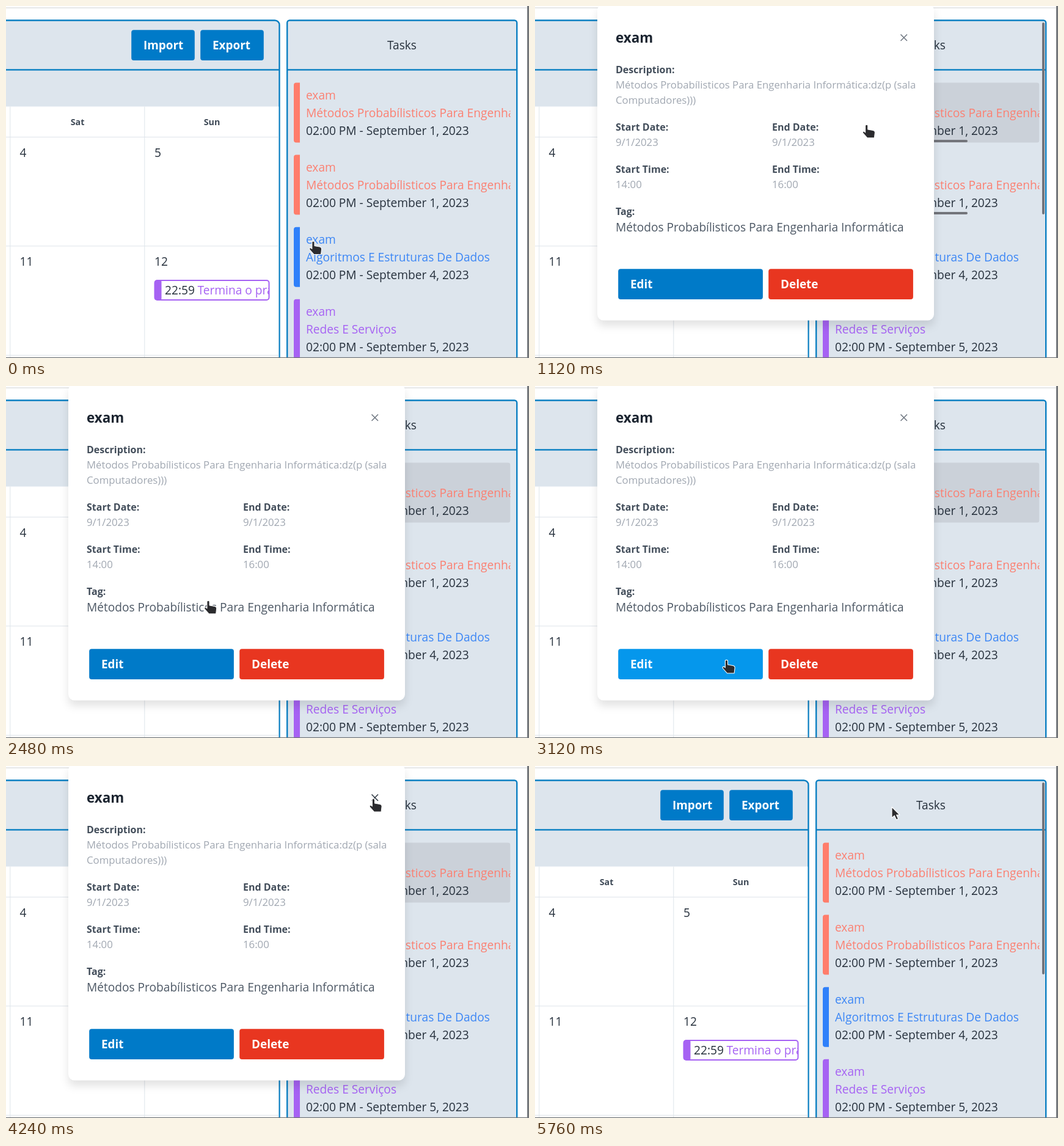
Write an HTML page that moves like this. It is 856 px wide and 576 px high and loops after 5840 ms.

```html
<!DOCTYPE html>
<html lang="en">
<head>
<meta charset="utf-8">
<title>Calendar tasks</title>
<style>
  html, body { margin: 0; width: 100%; height: 100%; overflow: hidden; background: #fff; }
  svg { display: block; width: 856px; height: 576px; }
  text { font-family: 'Open Sans', 'Noto Sans', sans-serif; font-size: 19.15px; fill: #27313d; white-space: pre; }
  .btn { font-size: 18.9px; font-weight: 700; fill: #fff; }
  .day { font-size: 14.3px; font-weight: 700; fill: #3f4a57; }
  .title { font-size: 22.4px; font-weight: 700; fill: #1b2430; }
  .label { font-size: 16px; font-weight: 700; fill: #424d5a; }
  .value { font-size: 16.75px; fill: #a0a7b1; }
  .tag { font-size: 19.12px; fill: #4d5865; }
  .mid { text-anchor: middle; }
  #modal-box { filter: drop-shadow(0 9px 7px rgba(0, 0, 0, .11)); }
</style>
</head>
<body>
<svg id="stage" viewBox="0 0 856 576"></svg>
<script>
const BLUE = '#007ac8', EDGE = '#0a7fc2', PANEL = '#dde5ed', GRID = '#dfe4ea';
const SALMON = '#fb8072', PURPLE = '#a662f3';
const LOOP = 5840, STEP = 80;

const rect = (x, y, w, h, fill, more = '') =>
  `<rect x="${x}" y="${y}" width="${w}" height="${h}" fill="${fill}" ${more}/>`;
const text = (x, y, str, cls = '', more = '') =>
  `<text x="${x}" y="${y}" class="${cls}" ${more}>${str}</text>`;
const button = (x, y, w, label, fill, id = '') =>
  rect(x, y, w, 49.7, fill, `rx="4" id="${id}"`) + text(x + 19.8, y + 31.8, label, 'btn');
const field = (x, y, label, value) =>
  text(x, y, label, 'label') + text(x, y + 25, value, 'value');

const course = 'Métodos Probabílisticos Para Engenharia Informática';
const tasks = [
  [course, 'September 1', SALMON, '#ff7d6b'],
  [course, 'September 1', SALMON, '#ff7d6b'],
  ['Algoritmos E Estruturas De Dados', 'September 4', '#3d87f5', '#2f80fa'],
  ['Redes E Serviços', 'September 5', PURPLE, PURPLE],
];

function task([name, day, color, bar], i) {
  const y = 125.5 + 118.1 * i;
  return rect(471, y, 354.5, 98, '#cbd1d9', `rx="4" id="hover${i}" opacity="0"`) +
    `<path d="M481 ${y}v98h-6a4 4 0 0 1-4-4v-90a4 4 0 0 1 4-4z" fill="${bar}"/>` +
    text(491, y + 27, 'exam', '', `style="fill:${color}"`) +
    text(491, y + 56.5, name, '', `style="fill:${color}"`) +
    text(491, y + 85.5, `02:00 PM - ${day}, 2023`) +
    rect(474, y + 93.5, 234, 4, '#73757b', `rx="2" id="bar${i}" opacity="0"`);
}

const calendar =
  `<path d="M-9 23.5H440a7.5 7.5 0 0 1 7.5 7.5V600H-9z" fill="${PANEL}" stroke="${EDGE}" stroke-width="2.4"/>` +
  rect(0, 164.5, 446.3, 420, '#fff') +
  rect(0, 103.2, 447, 2.4, EDGE) +
  [214, 392.3, 571].map(y => rect(0, y, 446.3, 1, GRID)).join('') +
  [6.3, 226.3].map(x => rect(x, 164.5, 1, 420, GRID)).join('') +
  button(205.2, 39.2, 103.6, 'Import', BLUE) + button(318.2, 39.2, 103.6, 'Export', BLUE) +
  text(117, 195, 'Sat', 'day mid') + text(337, 195, 'Sun', 'day mid') +
  text(22.5, 247, '4') + text(243, 247, '5') + text(22.5, 425, '11') + text(243, 425, '12') +
  rect(243.5, 449, 187, 32, '#fff', `rx="4" stroke="${PURPLE}" stroke-width="2"`) +
  rect(243.5, 449, 11, 32, PURPLE, 'rx="2"') +
  `<g clip-path="url(#eventClip)">${text(260, 472, '22:59')}` +
  text(313.5, 472, 'Termina o prazo', '', `style="fill:${PURPLE}"`) + '</g>';

const sidebar =
  rect(460.2, 23.5, 376, 600, PANEL, `rx="4" stroke="${EDGE}" stroke-width="2.4"`) +
  rect(460, 103.2, 376, 2.4, EDGE) +
  text(648, 71, 'Tasks', 'mid') +
  `<g clip-path="url(#taskClip)">${tasks.map(task).join('')}</g>` +
  rect(830, 27, 4, 314, '#73757b', 'rx="2" id="scroll" opacity="0"');

const modal = '<g id="modal" visibility="hidden">' +
  rect(102, -3, 551, 517.5, '#fff', 'rx="10" id="modal-box"') +
  text(132, 60, 'exam', 'title') +
  '<path id="close" d="M598.5 46.5l10.5 10.5m0-10.5l-10.5 10.5" stroke-width="1.5"/>' +
  field(132, 110, 'Description:', course + ':dz(p (sala') +
  text(132, 160, 'Computadores)))', 'value') +
  field(132, 204, 'Start Date:', '9/1/2023') + field(388, 204, 'End Date:', '9/1/2023') +
  field(132, 273, 'Start Time:', '14:00') + field(388, 273, 'End Time:', '16:00') +
  text(132, 342, 'Tag:', 'label') + text(132, 369, course, 'tag') +
  button(136.2, 430.2, 236.7, 'Edit', BLUE, 'edit') +
  button(382.2, 430.2, 236.7, 'Delete', '#e83620', 'delete') + '</g>';

const pointers = '<g id="cursor" fill="#2b2b2e" stroke="#fff" stroke-width="1.1" stroke-linejoin="round">' +
  '<path id="arrow" d="M0 0V18L4.3 14.2 7.5 21 10.6 19.6 7.6 13H13Z"/>' +
  '<path id="hand" d="M-2.2 1.6C-2.2-.7 2-.7 2 1.6V7.5L10.5 9C13 9.5 13.8 11 13.6 13L12.6 21.5H1L-5.6 14C-7.8 11.2-5 9.8-3.3 11.4L-2.2 12.4Z"/></g>';

const $ = id => document.getElementById(id);
$('stage').innerHTML =
  '<defs><clipPath id="eventClip"><rect x="244" y="449" width="186.5" height="32"/></clipPath>' +
  '<clipPath id="taskClip"><rect x="471" y="106" width="354.5" height="470"/></clipPath></defs>' +
  rect(0, 0, 856, 576, '#fff') + rect(0, 2, 853, 2, '#e7e8e9') +
  calendar + sidebar + modal +
  rect(853, 0, 3, 576, '#74777b') + rect(0, 574.8, 856, 1.2, '#74777b') + pointers;

// Rows of [time, ...values]
const path = [
  [0, 503, 385], [240, 516, 325], [640, 551, 212], [880, 562, 186], [1280, 530, 200],
  [1440, 520, 202], [1760, 421, 205], [2000, 328, 300], [2080, 329, 310], [2640, 332, 368],
  [3120, 313.5, 448.5], [3280, 405, 455], [3440, 450, 457], [3600, 455, 454], [4160, 601.5, 71],
  [4240, 601.5, 53.5], [4960, 601.5, 53.5], [5040, 600, 56], [5280, 600, 56], [5760, 584, 67],
];
const fades = {
  scroll: [[0, 0], [160, 1], [1840, 1], [2240, 0], [5280, 0], [5440, 1]],
  bar0: [[640, 0], [720, 1], [1760, 1], [2160, 0]],
  bar1: [[240, 0], [320, 1], [1600, 1], [1760, .72], [2000, 0]],
};

function at(rows, t) {
  const n = rows.findIndex(r => r[0] > t);
  if (n < 0) return rows[rows.length - 1].slice(1);
  if (n === 0) return rows[0].slice(1);
  const a = rows[n - 1], b = rows[n], k = (t - a[0]) / (b[0] - a[0]);
  return a.slice(1).map((v, i) => v + (b[i + 1] - v) * k);
}

const set = (id, name, value) => $(id).setAttribute(name, value);
const show = (id, on) => set(id, 'visibility', on ? 'visible' : 'hidden');

function draw(t) {
  const within = (a, b) => t >= a && t < b;
  const [x, y] = at(path, t);
  const arrow = within(560, 720) || t >= 5040;
  set('cursor', 'transform', `translate(${x.toFixed(1)} ${y.toFixed(1)})`);
  show('arrow', arrow);
  show('hand', !arrow);
  for (const id in fades) set(id, 'opacity', at(fades[id], t)[0]);
  set('hover0', 'opacity', +within(720, 5040));
  set('hover1', 'opacity', +within(240, 560));
  set('hover2', 'opacity', +within(80, 240));
  show('modal', within(960, 5040));
  set('edit', 'fill', within(3040, 3360) ? '#0597ec' : BLUE);
  set('delete', 'fill', within(3360, 3680) ? '#f05744' : '#e83620');
  set('close', 'stroke', within(4240, 5040) ? '#2f3842' : '#6e7680');
}

const start = performance.now();
function tick() {
  const t = (performance.now() - start) % LOOP;
  draw(Math.floor(t / STEP) * STEP);
  requestAnimationFrame(tick);
}
draw(0);
requestAnimationFrame(tick);
</script>
</body>
</html>
```
